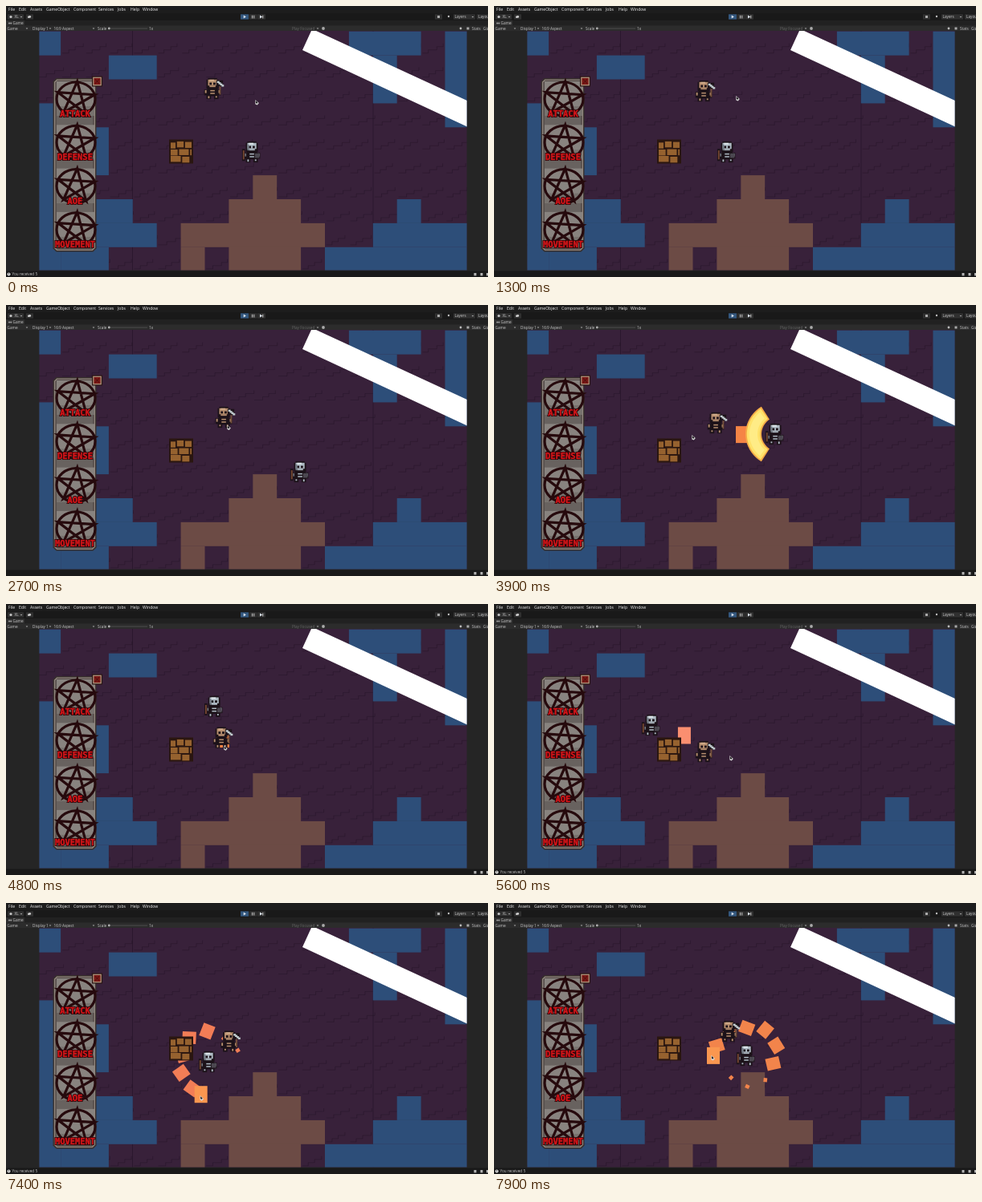
Write an HTML page with a canvas that moves like this. It is 600 px wide and 338 px high and loops after 8 s.

```html
<!DOCTYPE html>
<html lang="en">
<head>
<meta charset="utf-8">
<title>Dungeon test run</title>
<style>
html, body { margin: 0; width: 600px; height: 338px; overflow: hidden; background: #252525; }
canvas, svg { position: absolute; left: 0; top: 0; width: 600px; height: 338px; }
.ui { font: 4.7px "Open Sans", "Noto Sans", sans-serif; fill: #c8c8c8; }
.menu { font-size: 5.1px; fill: #f0f0f0; }
.dim { fill: #666; }
.label { font: bold 10.4px "DejaVu Sans Mono", monospace; fill: #d41519; text-anchor: middle; }
.edge { stroke: #22070a; stroke-width: 2; }
.face { stroke: #d41519; stroke-width: 0.4; }
</style>
</head>
<body>
<canvas id="back"></canvas>
<canvas id="front"></canvas>
<svg id="text" viewBox="0 0 600 338"></svg>
<script>
const LOOP = 8000, STEP = 100, TILE = 29.9;
const back = document.getElementById('back').getContext('2d');
const front = document.getElementById('front').getContext('2d');
const svg = document.getElementById('text');

// Sharp drawing on dense screens
const ratio = Math.max(1, window.devicePixelRatio || 1);
for (const c of [back, front]) {
  c.canvas.width = 600 * ratio;
  c.canvas.height = 338 * ratio;
  c.scale(ratio, ratio);
}

function box(c, color, x, y, w, h) {
  c.fillStyle = color;
  c.fillRect(x, y, w, h);
}

function poly(c, color, points) {
  c.fillStyle = color;
  c.beginPath();
  for (const [x, y] of points) c.lineTo(x, y);
  c.closePath();
  c.fill();
}

function dot(c, color, x, y, r) {
  c.fillStyle = color;
  c.beginPath();
  c.arc(x, y, r, 0, 7);
  c.fill();
}

function write(cls, x, y, string) {
  const el = document.createElementNS('http://www.w3.org/2000/svg', 'text');
  el.setAttribute('class', cls);
  el.setAttribute('x', x);
  el.setAttribute('y', y);
  el.textContent = string;
  svg.append(el);
  return el;
}

function seeded(seed) {
  return () => (seed = (seed * 16807) % 2147483647) / 2147483647;
}

function polar([x, y], deg, r) {
  const a = deg * Math.PI / 180;
  return [x + r * Math.cos(a), y + r * Math.sin(a)];
}

// ---- Ground ----

// Areas in tiles: column, row, width, height
function tiles(color, areas) {
  for (const [col, row, w, h] of areas) {
    box(back, color, 38.2 + col * TILE, 31.7 + row * TILE, w * TILE, h * TILE);
  }
}

function drawTexture() {
  const rand = seeded(41);
  back.strokeStyle = 'rgba(22,10,26,.25)';
  back.lineWidth = 1;
  for (let col = 0; col < 18; col++) {
    for (let row = 0; row < 10; row++) {
      let x = 40 + col * TILE, y = 58.7 + row * TILE;
      back.beginPath();
      back.moveTo(x, y);
      for (let i = 0; i < 3; i++) {
        x += 7 + rand() * 4;
        back.lineTo(x, y);
        y -= 4;
        back.lineTo(x, y);
      }
      back.stroke();
    }
  }
}

function drawGround() {
  back.save();
  back.beginPath();
  back.rect(41.4, 31, 532.2, 298.6);
  back.clip();
  box(back, '#38213a', 41, 31, 533, 299);
  drawTexture();
  for (const x of [157, 456.5]) box(back, 'rgba(18,8,24,.35)', x, 31, 1, 299);
  tiles('#2d4e79', [
    [0, 0, 1, 1], [3, 1, 2, 1], [0, 3, 1, 7], [1, 4, 2, 2], [1, 7, 3, 1], [1, 8, 4, 1], [1, 9, 2, 1],
    [13, 0, 3, 1], [14, 1, 1, 2], [17, 0, 1, 4], [15, 7, 1, 1], [14, 8, 4, 1], [12, 9, 6, 1]
  ]);
  tiles('#6c4b45', [[9, 6, 1, 1], [8, 7, 3, 3], [6, 8, 6, 1], [6, 9, 1, 1]]);
  poly(back, '#fff', [[380, 31], [386, 31], [574, 118], [574, 150.5], [369, 55]]);
  back.restore();
}

// ---- Skill panel ----

function drawSlot(name, i) {
  const cy = 116 + i * 54.3;
  box(back, '#88837f', 63, cy - 22, 47, 43);
  box(back, '#77726e', 63, cy + 9, 47, 12);
  back.strokeStyle = '#260a0d';
  back.lineWidth = 3.2;
  back.beginPath();
  back.ellipse(87, cy, 24, 21, 0, 0, 7);
  back.stroke();
  back.beginPath();
  for (let k = 0; k < 5; k++) {
    const [x, y] = polar([0, 0], -86 + k * 144, 24);
    back.lineTo(87 + x, cy + y * 0.92);
  }
  back.closePath();
  back.stroke();
  for (const cls of ['edge', 'face']) write('label ' + cls, 86, cy + 22, name);
}

function drawPanel() {
  ['#362e2c', '#91867e', '#514845', '#68625f'].forEach((color, i) => {
    const d = i * 1.4, cut = 4 - d / 2;
    const [l, t, r, b] = [58.5 + d, 90 + d, 112.5 - d, 306.5 - d];
    poly(back, color, [[l + cut, t], [r - cut, t], [r, t + cut], [r, b - cut],
      [r - cut, b], [l + cut, b], [l, b - cut], [l, t + cut]]);
  });
  ['ATTACK', 'DEFENSE', 'AOE', 'MOVEMENT'].forEach(drawSlot);
  ['#2b1514', '#b39a82', '#7a1916'].forEach((color, i) => {
    box(back, color, 107 + i * 1.2, 87.5 + i * 1.2, 13 - i * 2.4, 13 - i * 2.4);
  });
  for (let i = 0; i < 5; i++) {
    box(back, '#4a0d0d', 111 + i, 91.5 + i, 1, 1);
    box(back, '#4a0d0d', 115 - i, 91.5 + i, 1, 1);
  }
}

// ---- Editor bars ----

function arrow(x, y) {
  poly(back, '#b5b5b5', [[x - 1.3, y], [x + 1.3, y], [x, y + 1.5]]);
}

function button(x, w, color = '#303030') {
  box(back, color, x, 10.3, w, 6.4);
}

function play(x) {
  poly(back, '#dde4ec', [[x, 11.5], [x + 3.2, 13.5], [x, 15.5]]);
}

function drawMenu() {
  box(back, '#1d1d1d', 0, 0, 600, 9);
  const menu = { File: 3, Edit: 16, Assets: 30, GameObject: 50, Component: 84,
    Services: 115, Jobs: 139, Help: 155, Window: 170 };
  for (const name in menu) write('ui menu', menu[name], 6.1, name);
}

function drawToolbar() {
  box(back, '#191919', 0, 9, 600, 9);
  button(2, 20);
  dot(back, '#c8c8c8', 6, 13.5, 1.6);
  write('ui', 10.5, 15.2, 'XL');
  arrow(19, 13);
  button(25, 9);
  dot(back, '#d0d0d0', 28.3, 13.8, 1.3);
  dot(back, '#d0d0d0', 29.7, 13.4, 1.4);
  for (let i = 0; i < 3; i++) button(292 + i * 10.5, 10, i ? '#303030' : '#34587f');
  play(295.7);
  play(316);
  for (const x of [306, 308.2, 319.3]) box(back, '#c8c8c8', x, 11.7, 1, 3.8);
  button(534, 9);
  box(back, '#aaa', 537, 12, 3, 3);
  dot(back, '#bbb', 551, 13, 1.2);
  button(557, 27);
  write('ui', 558.5, 15.1, 'Layers');
  arrow(581, 13);
  button(586, 14);
  write('ui', 588, 15.1, 'Layout');
}

function drawViewBar() {
  box(back, '#212121', 0, 18, 600, 6.5);
  box(back, '#303030', 0, 18, 23, 6.5);
  box(back, '#2c2c2c', 0, 24.5, 600, 6.5);
  for (const x of [4, 6.2]) dot(back, '#aaa', x, 21.5, 1);
  write('ui', 8.5, 23.2, 'Game');
  const options = { 'Game': 1.5, 'Display 1': 33, '16:9 Aspect': 59.5, 'Scale': 114, '1x': 178, 'Stats': 580, 'Gizmos': 594 };
  for (const name in options) write('ui', options[name], 29.6, name);
  write('ui dim', 356, 29.6, 'Play Focused');
  for (const x of [26, 55, 109, 388]) arrow(x, 27.5);
  box(back, '#5a5a5a', 127, 27.7, 49, 0.7);
  dot(back, '#b0b0b0', 128.3, 28, 1.4);
  dot(back, '#aaa', 395, 28, 1.9);
  dot(back, '#bbb', 566, 28, 1.4);
  box(back, '#aaa', 573.5, 26.5, 3, 3);
}

function drawEditor() {
  box(back, '#252525', 0, 0, 600, 338);
  drawMenu();
  drawToolbar();
  drawViewBar();
  box(back, '#191919', 0, 330.5, 600, 7.5);
  for (const x of [582.5, 590.5, 598]) box(back, '#b5b5b5', x, 333, 3, 3.4);
}

// ---- Characters ----

const INK = '#1c1219', BONE = '#b78f6f', STEEL = '#aebac3';

function drawFigure([x, y], t, skin, shine, extras) {
  const u = 1.87, stride = Math.floor(t / 200) % 2;
  const put = (color, ...r) => box(front, color, ...r);
  const pair = (color, px, py, w, h) => {
    put(color, px, py, w, h);
    put(color, 12 - px - w, py, w, h);
  };
  front.save();
  front.translate(x - 6.5 * u, y - 7 * u);
  front.scale(u, u);
  put(INK, 3, 0, 6, 8);
  put(INK, 2, 1, 8, 6);
  put(INK, 2.5, 7, 7, 5);
  pair(INK, 0.5, 7.5, 3, 4);
  pair(INK, 2, 11, 3, 3);
  put(skin, 3, 1, 6, 4);
  put(shine, 4, 1, 3, 1);
  pair(INK, 4, 3, 1.5, 1.5);
  put(skin, 4, 5, 4, 1);
  for (let i = 0; i < 2; i++) put(skin, 4.5, 8 + i * 1.8, 3, 0.8);
  pair(skin, 1, 8, 1, 2);
  put(skin, 3, 12, 1, 1.5 - stride * 0.5);
  put(skin, 8, 12, 1, 1 + stride * 0.5);
  extras(put);
  front.restore();
}

function axe(put) {
  put(INK, 8.5, 1.5, 4.5, 4);
  for (let i = 0; i < 4; i++) put('#c3ced1', 9 + i, 2 + i * 0.8, 1.6, 1.3);
  put('#75513b', 10.5, 5.5, 1, 5.5);
}

function swordAndCape(put) {
  put(INK, -0.5, 5, 2, 8);
  put('#754631', 0, 6, 1, 6);
  put('#4b4750', 8, 8, 3, 3);
  put('#717a84', 3, 2, 1, 4);
}

// ---- Objects ----

function drawCrate() {
  const left = 203, top = 166.5, rand = seeded(7);
  box(front, '#2a1610', left, top, 30, 30);
  for (let row = 0; row < 3; row++) {
    let x = 2;
    while (x < 27) {
      const w = Math.min(28 - x, 6 + rand() * 8);
      const sag = rand() * 2;
      box(front, '#96622f', left + x, top + 2 + row * 9 + sag, w, 7.4);
      x += w + 1.8;
    }
  }
}

function square([x, y], w, h, turn, color) {
  front.save();
  front.translate(x, y);
  front.rotate(turn);
  box(front, color, -w / 2, -h / 2, w, h);
  front.restore();
}

// The weapon points at the mouse, then whirls ever faster
const SPIN = 5600;

function weaponAngle(knight, mouse, t) {
  const s = (t - SPIN) / 1000;
  if (s >= 0) return 18 - 182 * s - 94.5 * s * s;
  return Math.atan2(mouse[1] - knight[1], mouse[0] - knight[0]) * 180 / Math.PI;
}

function drawWeapon(knight, angle, t) {
  const s = (t - SPIN) / 1000;
  const big = Math.round(1.4 + 2 * s), all = Math.round(5 * s - 2.5);
  for (let i = 0; i < all; i++) {
    const size = i < big ? 17 : 5;
    const spot = polar(knight, angle + 18 + i * 36, 37 + 3 * Math.sin(i * 2 + 1));
    const color = `rgb(242,${100 + 14 * s},${126 - 22 * s})`;
    square(spot, size, size * 0.9, i * 1.9 + angle / 70, color);
  }
  square(polar(knight, angle, 42), 16, 21, 0, s < 0 ? '#f58445' : s < 0.7 ? '#fa8f70' : '#fa9750');
}

function drawSlash([kx, ky]) {
  const bands = { '#f5ac48': 0, '#ffe26a': 1.8, '#ffec86': 5 };
  for (const color in bands) {
    const inset = bands[color], points = [];
    const sweep = 56 - inset * 1.6;
    for (let k = -1; k <= 1; k += 0.1) points.push(polar([0, 0], 180 + k * sweep, 45 - inset));
    for (let k = 1; k >= -1; k -= 0.1) points.push(polar([0, 0], 180 + k * (sweep - 3), 25 + inset));
    poly(front, color, points.map(([x, y]) => [kx + 7 + x, ky + y * 0.92]));
  }
}

function drawMouse([x, y]) {
  poly(front, '#d8d8d8', [[x - 0.6, y - 0.6], [x - 0.6, y + 5], [x + 1.8, y + 6], [x + 3.8, y + 3.5]]);
  poly(front, '#222', [[x, y + 0.6], [x, y + 3.6], [x + 1.6, y + 4.2], [x + 2.4, y + 2.9]]);
}

// ---- Motion ----

// Key points [time, x, y], linear between them
function at(keys, t) {
  let i = 0;
  while (i < keys.length - 2 && t >= keys[i + 1][0]) i++;
  const [t0, x0, y0] = keys[i], [t1, x1, y1] = keys[i + 1];
  const k = Math.min(1, (t - t0) / (t1 - t0));
  return [x0 + (x1 - x0) * k, y0 + (y1 - y0) * k];
}

const knightKeys = [[0, 307, 182], [1300, 291, 182], [2700, 367, 208], [3900, 351, 161],
  [4900, 250, 124], [5600, 197, 151], [6900, 191, 206], [7900, 315, 190]];
const skullKeys = [[0, 258, 103], [1300, 262, 106], [2700, 272, 140], [3900, 277, 147],
  [5600, 262, 184], [6900, 264, 185], [7900, 293, 160]];
const mouseKeys = [[0, 311, 117.5], [1300, 302, 112.5], [2700, 276, 150], [3900, 247, 162.5], [5600, 294, 189.5]];

drawEditor();
drawGround();
drawPanel();
const logText = write('ui', 7.5, 336.2, 'You received 5');

function render(t) {
  const knight = at(knightKeys, t);
  let mouse = at(mouseKeys, t);
  const angle = weaponAngle(knight, mouse, t);
  if (t > SPIN) mouse = polar(knight, angle, 44);
  const logged = t < 600 || t >= 5000;

  front.clearRect(0, 0, 600, 338);
  logText.style.visibility = logged ? 'visible' : 'hidden';
  if (logged) {
    dot(front, '#e0e0e0', 3.5, 334.5, 2);
    box(front, '#333', 3.1, 333.2, 0.8, 1.8);
  }
  if (t >= 3700) drawWeapon(knight, angle, t);
  drawCrate();
  if (t >= 3800 && t < 4100) drawSlash(knight);
  drawFigure(at(skullKeys, t), t, BONE, '#d3af8c', axe);
  drawFigure(knight, t, STEEL, '#e3ebef', swordAndCape);
  drawMouse(mouse);
}

const start = performance.now();
function tick() {
  const t = (performance.now() - start) % LOOP;
  render(Math.floor(t / STEP) * STEP);
  requestAnimationFrame(tick);
}
tick();
</script>
</body>
</html>
```
